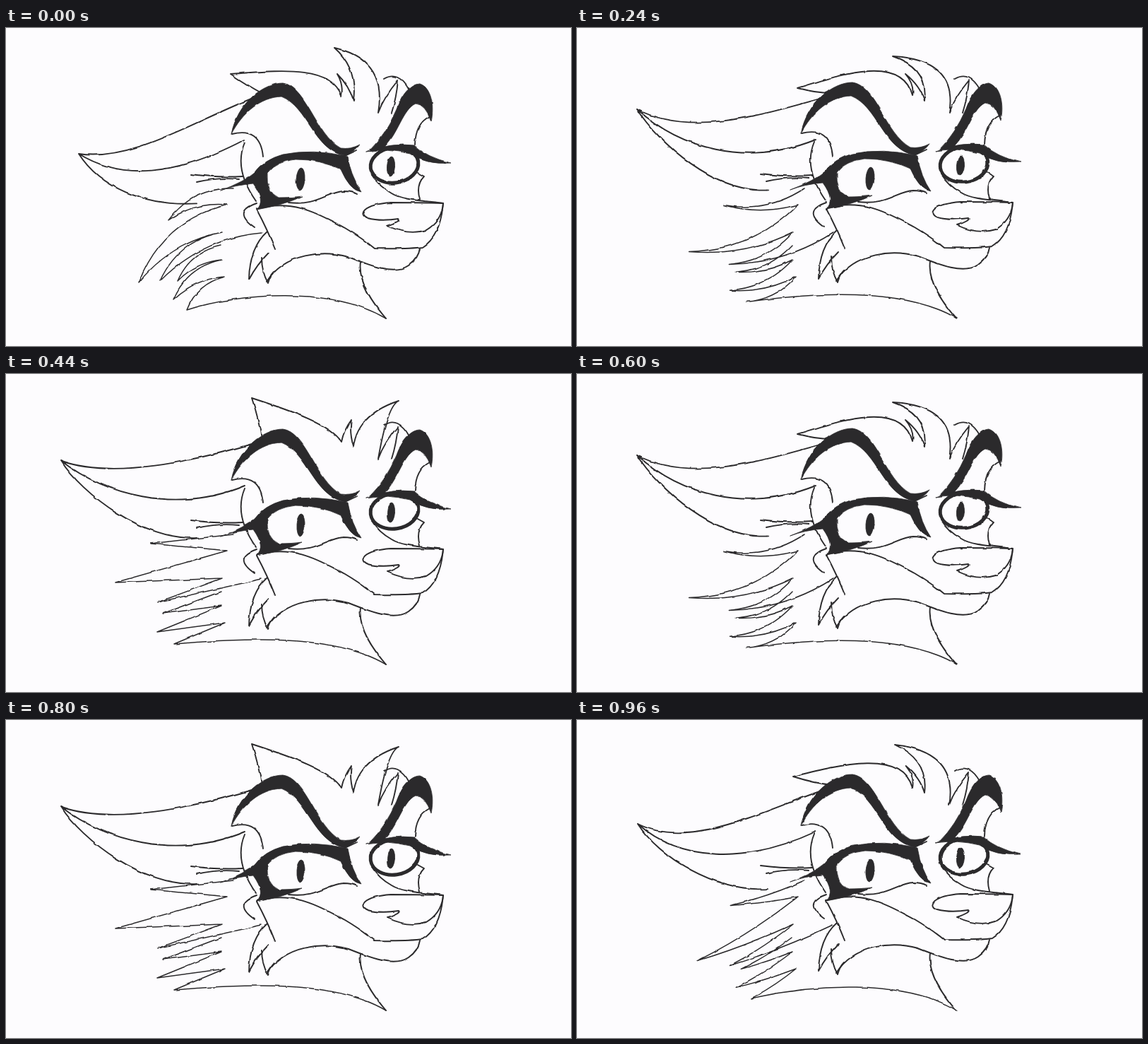
An HTML page that plays this animation: 800 px wide and 450 px high, repeating every 1000 ms.

```html
<!DOCTYPE html>
<html lang="en">
<head>
<meta charset="utf-8">
<title>Fur in the wind</title>
<style>
html, body { margin: 0; height: 100%; overflow: hidden; background: #fdfcfe; }
svg { display: block; width: 100vw; height: 100vh; }
path, ellipse { fill: none; stroke: #2b2a2c; stroke-width: 1.9; stroke-linecap: round; stroke-linejoin: round; }
.solid { fill: #2b2a2c; stroke-width: .8; }
#fur { stroke-width: 1.5; }
#rim { stroke-width: 5; }
</style>
</head>
<body>
<svg viewBox="0 0 800 450">
  <filter id="pen" filterUnits="userSpaceOnUse" x="0" y="0" width="800" height="450" color-interpolation-filters="sRGB">
    <feTurbulence id="noise" type="fractalNoise" baseFrequency=".06" numOctaves="2"/>
    <feDisplacementMap in="SourceGraphic" scale="3" xChannelSelector="R" yChannelSelector="G" in2=""/>
  </filter>
  <g filter="url(#pen)">
    <g id="face">
      <!-- brows -->
      <path class="solid" d="M319 150C328 105 365 78 392 78C425 82 438 150 474 170Q488 172 501 165Q495 174 480 181C435 172 428 112 390 97C360 98 335 120 319 150Z"/>
      <path class="solid" d="M516 172Q538 150 553 115C562 90 575 79 586 79C602 84 607 110 602 132Q594 108 580 107C562 115 555 150 536 168Q525 174 516 172Z"/>
      <path d="M600 125Q580 135 579 165M478 182L497 173"/>
      <!-- eyes -->
      <path class="solid" d="M304 230Q338 217 352 205Q366 186 392 179Q435 170 484 182Q489 212 503 232Q487 230 474 200Q445 186 410 186Q382 189 370 205Q368 232 386 240Q405 240 420 238Q395 250 355 257Q368 245 350 220Q325 222 304 230Z"/>
      <path class="solid" d="M510 175Q545 162 578 166Q596 183 630 191Q595 194 572 178Q540 170 510 175Z"/>
      <ellipse id="rim" cx="550" cy="194" rx="34" ry="25" transform="rotate(-8 550 194)"/>
      <ellipse class="solid" cx="417" cy="214" rx="6" ry="16" transform="rotate(4 417 214)"/>
      <ellipse class="solid" cx="545" cy="196" rx="5.500" ry="14" transform="rotate(4 545 196)"/>
      <path d="M262 207Q300 212 335 210M270 218Q300 211 330 214"/>
      <!-- muzzle and nose -->
      <path d="M355 256C410 240 450 268 480 283Q505 298 522 312Q570 313 590 310Q615 295 619 248C585 244 560 243 546 234Q528 224 518 208M400 247C440 252 455 232 478 231Q490 231 497 235M583 205L592 210Q580 222 586 243"/>
      <path d="M619 248Q580 247 545 247C505 250 498 264 512 269Q530 274 556 270Q560 273 540 280Q570 294 595 286Q617 273 619 248"/>
      <!-- jaw, cheek and ear base -->
      <path d="M369 359C395 318 450 314 485 324C515 336 550 350 570 336Q584 326 586 312M502 331C498 360 520 390 538 411M355 257Q370 285 381 313"/>
      <path d="M370 288Q345 310 344 356Q355 335 372 318M362 325Q362 345 371 361Q374 350 380 344"/>
      <path d="M320 150Q360 140 364 182M338 162Q322 200 354 245M355 248Q320 260 352 282"/>
    </g>
    <path id="ear"/>
    <path id="hair"/>
    <path id="fur"/>
  </g>
</svg>
<script>
// Key poses: ear tip x y, ear sag, tuft tip x y, forelock tip x y, fur droop, fur bend, face shift
const poses = [
  [103, 178, 12, 318, 65, 465, 28, 1, .26, 0],
  [78, 123, 26, 348, 34, 556, 38, 0, 0, 0],
  [85, 115, 40, 312, 85, 447, 40, .33, -.2, -2],
  [86, 147, 38, 306, 80, 450, 35, .7, -.05, -2]
];
// Fur locks: upper root, tip when lifted, tip when drooping, lower root
const locks = [
  [322, 227, 205, 240, 230, 272, 313, 250],
  [313, 250, 155, 295, 188, 360, 306, 289],
  [306, 289, 215, 323, 218, 358, 362, 290],
  [304, 308, 222, 339, 243, 358, 305, 328],
  [305, 328, 214, 365, 237, 384, 310, 352],
  [310, 352, 238, 382, 256, 399]
];

const $ = id => document.getElementById(id);
const mix = (a, b, u) => a + (b - a) * u;

// Smooth cyclic blend from key pose k towards the next.
function blend(k, u) {
  const [a, b, c, d] = [3, 0, 1, 2].map(o => poses[(k + o) % 4]);
  return b.map((q, i) => q + u / 2 * (c[i] - a[i] + u * (2 * a[i] - 5 * q + 4 * c[i] - d[i] + u * (3 * (q - c[i]) + d[i] - a[i]))));
}

// Control point beside the middle of a line.
const bow = (x1, y1, x2, y2, b) => [(x1 + x2) / 2 - b * (y2 - y1), (y1 + y2) / 2 + b * (x2 - x1)];

function earPath(x, y, sag) {
  const low = 195 + .3 * y;
  return `M${x} ${y}C${x + 75} ${y + sag} 265 ${105 + .15 * y} 355 97` +
    `M${x} ${y}C${x + 60} ${y + 30 + .6 * sag} 238 ${175 + .2 * y} 338 158` +
    `M${x} ${y}C${x + 30} ${y + 47} 195 ${low + 4} 270 ${low}`;
}

function hairPath(tx, ty, fx, fy) {
  const notch = 465 + .22 * (fx - 447);
  return `M362 92Q${(tx + 370) / 2} ${ty / 2 + 50} ${tx} ${ty}` +
    `C${tx + 60} ${45 + .25 * ty} 460 ${96 - .7 * ty} 475 96` +
    `Q478 80 ${notch} 65Q486 82 492 103Q498 57 ${fx} ${fy}Q540 45 527 120` +
    'Q535 98 555 74Q553 98 546 120M535 72Q556 60 571 88';
}

function furPath(droop, bend) {
  let d = '';
  for (const [x1, y1, ax, ay, bx, by, x2, y2] of locks) {
    const x = mix(ax, bx, droop * droop), y = mix(ay, by, droop);
    d += `M${x1} ${y1}Q${bow(x1, y1, x, y, bend)} ${x} ${y}`;
    d += x2 ? `Q${bow(x2, y2, x, y, bend * .7)} ${x2} ${y2}` : 'C330 375 460 365 538 411';
  }
  return d;
}

let shown = -1;
function draw(now) {
  const slot = Math.floor(now % 1000 / 40);
  const step = (slot < 12 ? slot : slot - 1) % 8; // one drawing is held for two slots
  if (step !== shown) {
    shown = step;
    const [ex, ey, sag, tx, ty, fx, fy, droop, bend, shift] = step < 7 ? blend(Math.floor(step / 3), step % 3 / 3) : poses[3];
    $('ear').setAttribute('d', earPath(ex, ey, sag));
    $('hair').setAttribute('d', hairPath(tx, ty, fx, fy));
    $('fur').setAttribute('d', furPath(droop, bend));
    $('face').setAttribute('transform', `translate(${shift} ${shift / 2})`);
    $('noise').setAttribute('seed', step + 1);
  }
  requestAnimationFrame(draw);
}
$('noise').setAttribute('result', 'wobble');
document.querySelector('feDisplacementMap').setAttribute('in2', 'wobble');
draw(performance.now());
</script>
</body>
</html>
```
